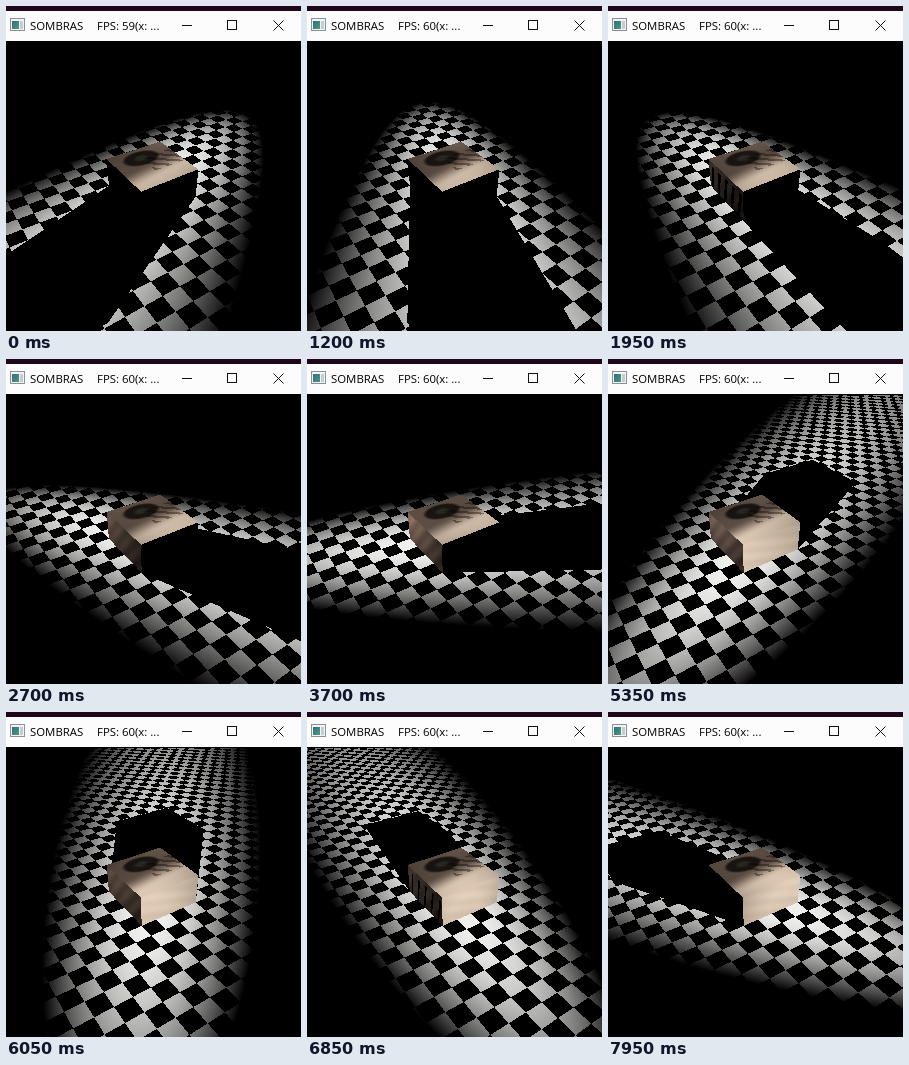
Write an HTML page with a canvas that moves like this. It is 295 by 325 pixels and loops after 8000 ms.

```html
<!DOCTYPE html>
<html lang="es">
<head>
<meta charset="utf-8">
<title>Sombras</title>
<style>
  html, body { margin: 0; width: 100%; height: 100%; overflow: hidden; background: #000; }
  svg, canvas { position: absolute; left: 0; display: block; }
  svg { top: 0; }
  canvas { top: 36px; image-rendering: pixelated; }
  text { font: 11.4px "Open Sans", "Noto Sans", sans-serif; fill: #000; white-space: pre; }
</style>
</head>
<body>
<svg width="295" height="36" viewBox="0 0 295 36">
  <defs>
    <linearGradient id="pic" x2="1" y2="1">
      <stop offset="0" stop-color="#2d6f86"/>
      <stop offset="1" stop-color="#4f9a78"/>
    </linearGradient>
  </defs>
  <rect width="295" height="36" fill="#1f0519"/>
  <rect y="5" width="295" height="30" fill="#fcfcfc"/>
  <rect y="35" width="295" height="1" fill="#000"/>
  <rect x="4.5" y="12.5" width="14" height="12" fill="#f3f3f3" stroke="#8b9196"/>
  <rect x="6" y="15" width="7" height="8" fill="url(#pic)"/>
  <rect x="14" y="15" width="3" height="8" fill="#c3cdd2"/>
  <text x="24" y="24">SOMBRAS</text>
  <text x="91" y="24" id="fps">FPS: 59(x: ...</text>
  <g fill="none" stroke="#111">
    <path d="M176 19.5h10"/>
    <rect x="221.5" y="14.5" width="9" height="9"/>
    <path d="M267.5 14.5l10 10m0-10l-10 10"/>
  </g>
</svg>
<canvas id="view" width="295" height="289"></canvas>
<script>
const W = 295, H = 289, TOP = 36, LOOP = 8000, STEP = 50;
const FLOOR = 0, LID = 1, FRONT = 2, SIDE = 3;
const rad = d => d * Math.PI / 180;
const clamp = x => Math.min(1, Math.max(0, x));
const ramp = (a, b, x) => clamp((x - a) / (b - a));
const smooth = (a, b, x) => { const t = ramp(a, b, x); return t * t * (3 - 2 * t); };

// Camera looks at the centre of the box base; the axes a, b follow the box edges.
const cam = { cx: 145.5, cy: 185, focal: 362, dist: 5.78, pitch: rad(37), yaw: rad(33.4) };
const box = { half: 0.5, height: 0.51 };
const lamp = { radius: 7.3, height: 1.95, inner: Math.cos(rad(2)), outer: Math.cos(rad(12.6)) };
const CELL = 0.25;

const toBox = (u, v) => {
  const c = Math.cos(cam.yaw), s = Math.sin(cam.yaw);
  return [u * c + v * s, v * c - u * s];
};

// Soft stand-in for the eye picture; a and b run from 0 to 1.
function lidColor(a, b) {
  let tone = 1.08 - 0.62 * smooth(0.18, 0.55, b + 0.15 * (0.5 - a));
  tone += 0.08 * smooth(0.4, 1, a) * smooth(0.6, 1, b);
  if (a > 0.45 && b > 0.32 && b < 0.72 && Math.sin(a * 30 + b * 34) > 0.2) tone *= 0.65;
  const eye = Math.hypot((a - 0.46) / 0.31, (b - 0.73) / 0.2);
  tone *= 0.28 + 0.72 * smooth(0.8, 1.1, eye);
  const iris = 1 - smooth(0.2, 0.5, eye);
  const warm = clamp(1 - tone);
  return [210 * tone + 16 * iris, (190 - 24 * warm) * tone + 22 * iris, (170 - 30 * warm) * tone + 18 * iris];
}

function frontColor(a, h) {
  const tone = 1 + 0.08 * h + 0.02 * Math.sin(a * 9 + h * 14);
  return [212 * tone, 193 * tone, 173 * tone];
}

function sideColor(b, h) {
  const tone = (0.45 + 0.55 * b) * (0.7 + 0.4 * h) + 0.08 * Math.sin(b * 22 + h * 9);
  return [142 * tone, 116 * tone, 101 * tone];
}

function cast(x, y) {
  const { cx, cy, focal, dist, pitch } = cam;
  const sp = Math.sin(pitch), cp = Math.cos(pitch);
  const X = (x - cx) / focal, Y = (cy - y) / focal;
  const [da, db] = toBox(X, cp + sp * Y), dh = cp * Y - sp;
  const [oa, ob] = toBox(0, -dist * cp), oh = dist * sp;
  const at = t => [oa + da * t, ob + db * t, oh + dh * t];
  const inside = v => Math.abs(v) <= box.half;
  const onWall = h => h >= 0 && h <= box.height;

  let p = at((box.height - oh) / dh);
  if (inside(p[0]) && inside(p[1])) return { p, kind: LID, rgb: lidColor(p[0] + 0.5, p[1] + 0.5) };
  p = at((-box.half - ob) / db);
  if (inside(p[0]) && onWall(p[2])) return { p, kind: FRONT, rgb: frontColor(p[0] + 0.5, p[2] / box.height) };
  p = at((-box.half - oa) / da);
  if (inside(p[1]) && onWall(p[2])) return { p, kind: SIDE, rgb: sideColor(p[1] + 0.5, p[2] / box.height) };
  p = at(-oh / dh);
  const dark = (Math.floor(p[0] / CELL) + Math.floor(p[1] / CELL)) & 1;
  return dark ? null : { p, kind: FLOOR, rgb: [238, 238, 236] };
}

// Only points that can ever be lit are kept.
const points = [];
for (let y = 0; y < H; y++) {
  for (let x = 0; x < W; x++) {
    const hit = cast(x + 0.5, y + TOP + 0.5);
    if (hit) points.push({ i: (y * W + x) * 4, kind: hit.kind, rgb: hit.rgb, a: hit.p[0], b: hit.p[1], h: hit.p[2] });
  }
}

function inShadow(p, la, lb) {
  let near = 0, far = box.height / lamp.height;
  for (const [o, d] of [[p.a, la - p.a], [p.b, lb - p.b]]) {
    const t1 = (-box.half - o) / d, t2 = (box.half - o) / d;
    near = Math.max(near, Math.min(t1, t2));
    far = Math.min(far, Math.max(t1, t2));
  }
  return near < far;
}

// Walls at a grazing angle show dark stripes.
function wallLight(p, facing) {
  if (facing <= 0) return 0;
  const along = p.kind === FRONT ? p.a : p.b;
  const s = along * 5 + p.h * 0.9 + 5;
  if (p.h < 0.43 && s - Math.floor(s) < 0.42 - facing) return 0;
  return p.kind === FRONT ? 1 : 0.4 + 0.6 * facing;
}

const ctx = document.getElementById("view").getContext("2d");
const fps = document.getElementById("fps");
const image = ctx.createImageData(W, H);
const px = image.data;
for (let i = 3; i < px.length; i += 4) px[i] = 255;

function draw(ms) {
  const s = ms / 1000;
  const angle = rad(57 + 36.2 * s - 0.27 * s * s);
  const [ua, ub] = toBox(Math.cos(angle), Math.sin(angle));
  const la = ua * lamp.radius, lb = ub * lamp.radius, lh = lamp.height;
  const reach = Math.hypot(lamp.radius, lh);

  for (const p of points) {
    const a = p.a - la, b = p.b - lb, h = p.h - lh;
    const cos = -(a * la + b * lb + h * lh) / (Math.sqrt(a * a + b * b + h * h) * reach);
    let light = ramp(lamp.outer, lamp.inner, cos);
    if (light > 0) {
      if (p.kind === FLOOR) { if (inShadow(p, la, lb)) light = 0; }
      else if (p.kind === FRONT) light *= wallLight(p, -ub);
      else if (p.kind === SIDE) light *= wallLight(p, -ua);
    }
    for (let c = 0; c < 3; c++) px[p.i + c] = p.rgb[c] * light;
  }
  ctx.putImageData(image, 0, 0);
  fps.textContent = `FPS: ${ms < 500 ? 59 : 60}(x: ...`;
}

let last = -1;
function tick() {
  const step = Math.floor(performance.now() % LOOP / STEP);
  const ms = step < 2 ? 0 : step * STEP;
  if (ms !== last) draw(last = ms);
  requestAnimationFrame(tick);
}
tick();
</script>
</body>
</html>
```
